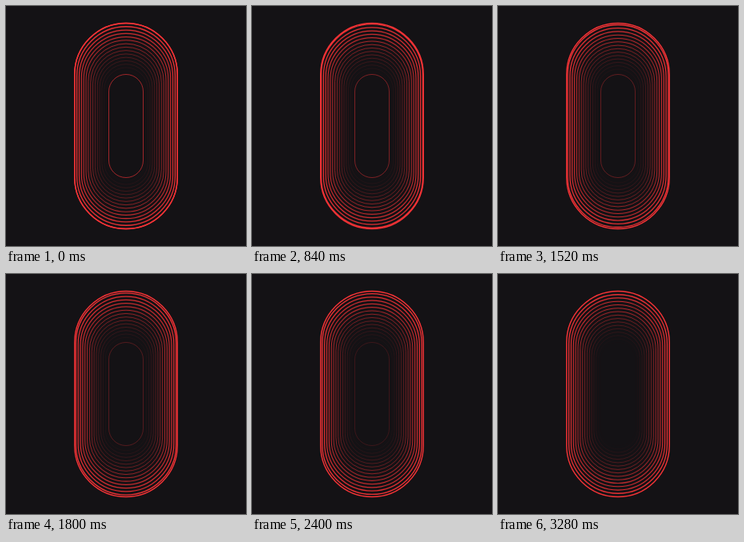
An HTML page with a canvas that plays this animation: 300 px wide and 300 px high, repeating every 3.32 s.

```html
<!DOCTYPE html>
<html>
<head>
<meta charset="utf-8">
<style>
html, body { margin: 0; width: 100%; height: 100%; overflow: hidden; background: #141215; }
canvas { display: block; width: 300px; height: 300px; }
</style>
</head>
<body>
<canvas id="stage" width="300" height="300"></canvas>
<script>
const ctx = document.getElementById('stage').getContext('2d');
const LOOP = 3320, GAPS = 15;
const mix = (a, b, k) => a + (b - a) * k;

// depth 0 is the outer capsule, 1 the inner one
function ring(depth, alpha, width) {
  const w = mix(128.5, 43, depth), h = mix(257, 129, depth);
  ctx.globalAlpha = alpha;
  ctx.lineWidth = width;
  ctx.beginPath();
  ctx.roundRect(150 - w / 2, 150 - h / 2, w, h, w / 2);
  ctx.stroke();
}

function draw(now) {
  const p = now % LOOP / LOOP;
  ctx.globalAlpha = 1;
  ctx.fillStyle = '#141215';
  ctx.fillRect(0, 0, 300, 300);
  ctx.strokeStyle = '#f53336';
  ring(1, 0.62 * (1 - p), 1);
  for (let i = GAPS - 1; i >= 0; i--) {
    const depth = (i + p) / GAPS;
    ring(depth, 1 - depth, mix(1.4, 0.4, depth));
  }
  ring(0, 1, 1.4);
}

function tick(now) {
  draw(now);
  requestAnimationFrame(tick);
}
draw(0);
requestAnimationFrame(tick);
</script>
</body>
</html>
```
